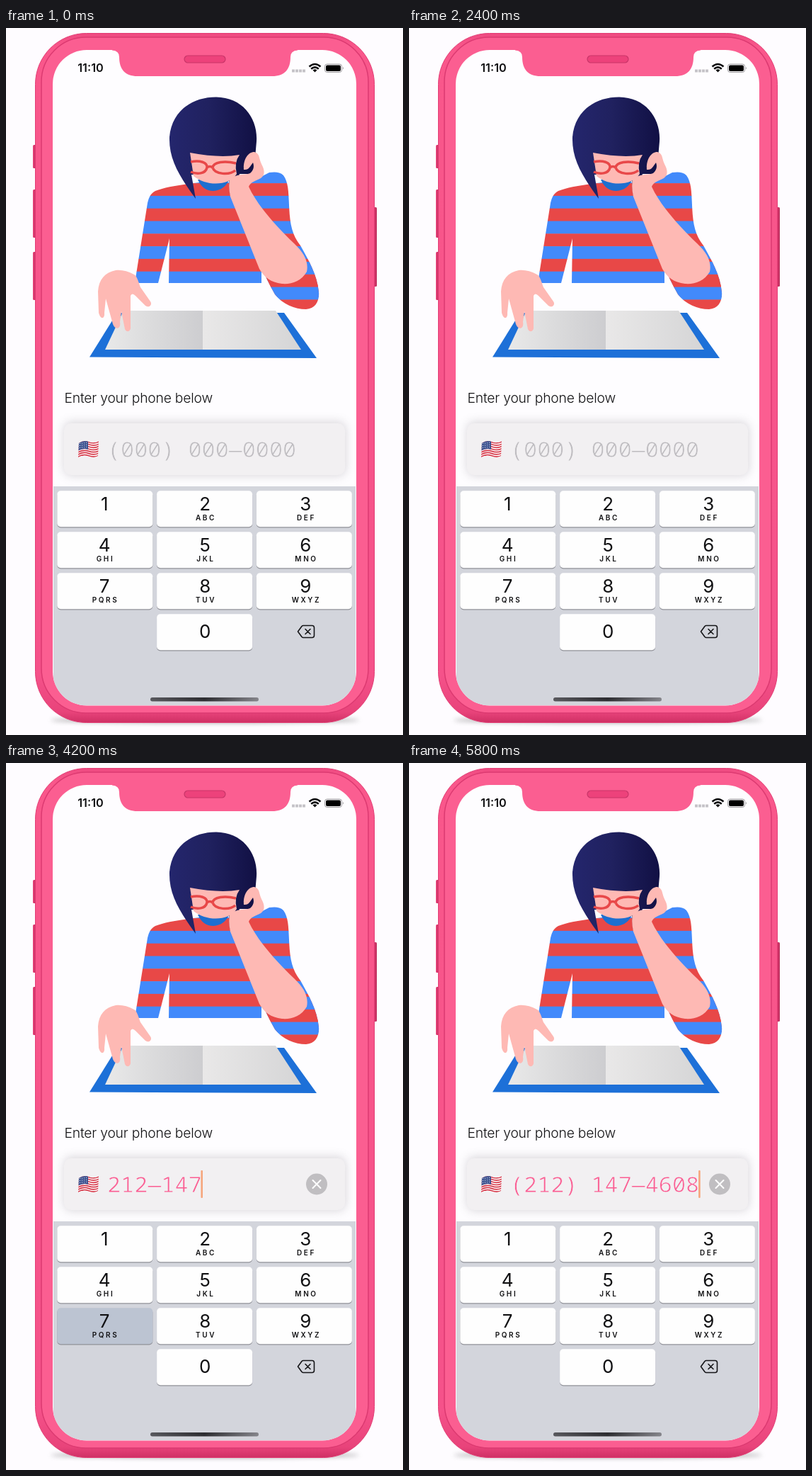
An HTML page that plays this animation: 561x998 px, repeating every 5.9 s.

```html
<!DOCTYPE html>
<html lang="en">
<head>
<meta charset="utf-8">
<title>Phone number entry</title>
<style>
  html, body { margin: 0; width: 100%; height: 100%; overflow: hidden; background: #fefcff; }
  svg { display: block; width: 100%; height: 100%; }
  text { font-family: Inter, Roboto, sans-serif; fill: #111113; }
  .digit { font-size: 26px; text-anchor: middle; }
  .letters { font-size: 10px; font-weight: 600; letter-spacing: 2.6px; text-anchor: middle; }
  .number { font: 300 31.8px "Noto Sans Mono", "DejaVu Sans Mono", monospace; stroke: #f2f0f2; stroke-width: .8px; }
</style>
</head>
<body>
<svg viewBox="0 0 561 998" xmlns="http://www.w3.org/2000/svg">
  <defs>
    <linearGradient id="hair"><stop stop-color="#24266d"/><stop offset=".45" stop-color="#20215f"/><stop offset="1" stop-color="#111044"/></linearGradient>
    <linearGradient id="leftPage"><stop stop-color="#e9e9e9"/><stop offset=".45" stop-color="#dcdcdd"/><stop offset="1" stop-color="#cdcdd0"/></linearGradient>
    <linearGradient id="rightPage"><stop stop-color="#e9e8e8"/><stop offset="1" stop-color="#d5d5d6"/></linearGradient>
    <linearGradient id="homeBar"><stop stop-color="#58585d"/><stop offset=".5" stop-color="#2d2d31"/><stop offset="1" stop-color="#85858b"/></linearGradient>
    <linearGradient id="rim" x2="0" y2="1"><stop stop-color="#ee4a81"/><stop offset=".02" stop-color="#f9578b"/><stop offset=".93" stop-color="#f5528a"/><stop offset=".985" stop-color="#e8437a"/><stop offset="1" stop-color="#cf3065"/></linearGradient>
    <linearGradient id="button"><stop stop-color="#e9427a"/><stop offset="1" stop-color="#b92a59"/></linearGradient>
    <filter id="soft" x="-20%" y="-40%" width="140%" height="180%"><feGaussianBlur stdDeviation="7"/></filter>
    <filter id="ground" x="-10%" y="-200%" width="120%" height="500%"><feGaussianBlur stdDeviation="3"/></filter>
    <clipPath id="screen"><rect x="66" y="31" width="429" height="925.500" rx="48"/></clipPath>
    <clipPath id="shirt">
      <path d="M273 218C250 221 226 224 211 230C204 234 202 239 200 247L182 360H215L231 297L230 360H361V336C366 350 372 362 380 376C391 390 408 397 424 397C437 396 443 386 442 373C440 348 427 327 416 307C404 292 401 276 400 250C399 230 399 218 392 208C387 203 380 203 372 204L345 218Z"/>
    </clipPath>
    <clipPath id="flag"><path d="M103 586Q110 581 117 584T131 583L130 604Q123 608 116 605T102 606Z"/></clipPath>
  </defs>

  <rect width="561" height="998" fill="#fefcff"/>
  <ellipse cx="281" cy="977" rx="218" ry="4" fill="#777" opacity=".65" filter="url(#ground)"/>
  <g id="buttons" fill="url(#button)"></g>
  <rect x="41.500" y="7.500" width="479" height="973" rx="72" fill="url(#rim)" stroke="#e23c74"/>
  <rect x="50" y="13" width="462" height="954" rx="63" fill="#fb5e91" stroke="#dc3a71" stroke-width="1.500"/>

  <g clip-path="url(#screen)">
    <rect x="66" y="31" width="430" height="926" fill="#fefdff"/>

    <g id="reader">
      <path d="M157 402H393L439 466L118 464.500Z" fill="#1d70d8"/>
      <path d="M166 399H278V454H140Z" fill="url(#leftPage)"/>
      <path d="M278 399H381L417 454H278Z" fill="url(#rightPage)"/>
      <g clip-path="url(#shirt)">
        <g id="stripes"></g>
        <g id="sleeve"></g>
      </g>
      <path d="M271 214Q278 230 293 230Q309 229 316 213Z" fill="#1d6fd0"/>
      <path d="M268 241C244 208 230 185 231 154C234 118 262 97.500 297 97.500C335 98 356 128 354 160L350 206H330L322 241L316 233L315 207H262Z" fill="url(#hair)"/>
      <path d="M260 176Q302 184 330 179Q322 190 326 206C315 223 284 224 265 209Z" fill="#feb9b4"/>
      <g fill="none" stroke="#e84849" stroke-width="3.500">
        <path d="M261 189C274 186 285 190 284 197C282 206 270 207 261 203M284 197Q288 194 292 197"/>
        <path d="M292 197C293 189 309 187 325 191M292 197C295 207 316 208 324 201"/>
      </g>
      <path d="M316 214C325 205 337 208 345 205C350 201 351 195 349 190C345 195 343 201 336 200C335 187 341 175 351 175C359 177 357 184 361 192C366 201 366 208 360 212C352 216 345 218 343 224C355 250 380 278 407 304C421 317 428 330 425 344C417 358 403 362 390 361C374 359 365 352 358 340L317 238Q314 225 316 214Z" fill="#feb9b4"/>
      <path d="M155 342C140 345 131 355 130 372L131 402C134 413 140 410 139 402L141 382L151 418C155 428 163 424 161 415L163 400L168 425C171 431 177 428 176 421L176 378Q178 373 183 378L197 392C203 396 207 390 204 386L190 366C187 358 185 350 181 348C172 343 163 341 155 342Z" fill="#feb9b4"/>
    </g>

    <text x="82.500" y="528.500" font-size="19.300" font-weight="300" letter-spacing="-.2">Enter your phone below</text>

    <rect x="82" y="556" width="398" height="76" rx="10" fill="#77727b" opacity=".28" filter="url(#soft)"/>
    <rect x="82" y="558" width="397" height="73" rx="10" fill="#f2f0f2"/>
    <g id="flagArt" clip-path="url(#flag)"></g>
    <text id="number" class="number" x="143" y="606"></text>
    <rect id="caret" y="575" width="2.600" height="39" rx="1" fill="#f6a67c"/>
    <g id="clear">
      <circle cx="439" cy="594.500" r="15" fill="#c0bec1"/>
      <path d="M433.500 589l11 11m0 -11l-11 11" stroke="#fff" stroke-width="2" stroke-linecap="round"/>
    </g>

    <rect x="67" y="647" width="427" height="309" fill="#d3d5dc"/>
    <g id="keys"></g>
    <path d="M420 843.500H432.500Q435.500 843.500 435.500 846.500V857.500Q435.500 860.500 432.500 860.500H420Q419 860.500 418 859.500L412.500 852L418 844.500Q419 843.500 420 843.500ZM423 848.500l7 7m0 -7l-7 7" fill="none" stroke="#151518" stroke-width="1.600" stroke-linecap="round" stroke-linejoin="round"/>
    <rect x="204" y="945" width="153" height="5.500" rx="2.700" fill="url(#homeBar)"/>
  </g>

  <path d="M150 30H412V31.500Q402 32 402 41C402 58 394 68 376 68H186C168 68 160 58 160 41Q160 32 150 31.500Z" fill="#fb5e91"/>
  <rect x="252" y="39" width="58" height="10" rx="5" fill="#ed427b" stroke="#c93569" stroke-width="1.200"/>

  <text x="119.500" y="62.300" font-size="16.300" font-weight="600" text-anchor="middle">11:10</text>
  <path d="M404 60.500H423" stroke="#c5c3c8" stroke-width="4" stroke-dasharray="4 1"/>
  <g fill="none" stroke="#0b0b0d" stroke-width="2.500">
    <path d="M428.500 54.500Q436.500 47.500 444.500 54.500M431.200 57.700Q436.500 53 441.800 57.700"/>
    <path d="M433.500 59.500Q436.500 57 439.500 59.500L436.500 62.500Z" fill="#0b0b0d" stroke="none"/>
  </g>
  <rect x="450.500" y="51" width="24" height="11.500" rx="3.300" fill="none" stroke="#9b999d"/>
  <rect x="452" y="52.500" width="21" height="8.500" rx="2"/>
  <path d="M476 55Q478 56.700 476 58.500Z" fill="#9b999d"/>
</svg>
<script>
const LOOP = 5900;
const ADVANCE = 19.1;
const PLACEHOLDER = '(000) 000—0000';
const DIGITS = '2121474608';
const PRESSES = [3000, 3200, 3400, 3700, 3900, 4100, 4500, 4800, 5100, 5400];
const HOLD = 200;
const ECHO = 100;
const RED = '#e84847';
const BLUE = '#428afb';

const el = id => document.getElementById(id);
const rect = (x, y, w, h, fill, rx = 0) =>
  `<rect x="${x}" y="${y}" width="${w}" height="${h}" rx="${rx}" fill="${fill}"/>`;
const clamp = v => Math.max(0, Math.min(1, v));

function drawButtons() {
  el('buttons').innerHTML = [[38, 165, 33], [38, 228, 68], [38, 316, 68], [519, 253, 112]]
    .map(([x, y, h]) => `<rect x="${x}" y="${y}" width="5" height="${h}" rx="1.5"/>`).join('');
}

function stripes(x, y, width, count, colors) {
  return Array.from({ length: count }, (_, i) =>
    rect(x, y + i * 17.8, width, 18.3, colors[i % 2])).join('');
}

function drawFlag() {
  let out = rect(100, 578, 34, 32, '#fff');
  for (let i = 0; i < 13; i += 2) {
    const y = 586.6 + i * 1.6;
    out += `<path d="M101 ${y}Q109 ${y - 5} 117 ${y - 2}T132 ${y - 3}" fill="none" stroke="#d63b4c" stroke-width="1.7"/>`;
  }
  out += '<path d="M101 580H116V595Q109 592 101 597Z" fill="#3f5592"/>';
  for (let i = 0; i < 12; i++) {
    out += `<circle cx="${104.5 + i % 4 * 3}" cy="${586.5 + Math.floor(i / 4) * 3 - i % 4 * .4}" r=".55" fill="#fff"/>`;
  }
  el('flagArt').innerHTML = out;
}

function drawKeys() {
  const letters = ['', 'ABC', 'DEF', 'GHI', 'JKL', 'MNO', 'PQRS', 'TUV', 'WXYZ'];
  el('keys').innerHTML = [1, 2, 3, 4, 5, 6, 7, 8, 9, 0].map(n => {
    const slot = n ? n - 1 : 10;
    const column = slot % 3;
    const x = 72.3 + column * 140.8;
    const y = 653.3 + Math.floor(slot / 3) * 58;
    const mid = 139.2 + column * 142;
    return rect(x, y + 1.2, 135, 51, '#909198', 5) +
      `<rect id="key${n}" x="${x}" y="${y}" width="135" height="51" rx="5"/>` +
      `<text class="digit" x="${mid}" y="${y + (n ? 27.5 : 34)}">${n}</text>` +
      (n ? `<text class="letters" x="${mid + 1.3}" y="${y + 42}">${letters[n - 1]}</text>` : '');
  }).join('');
}

function formatNumber(d) {
  if (d.length < 4) return d;
  if (d.length < 8) return `${d.slice(0, 3)}—${d.slice(3)}`;
  return `(${d.slice(0, 3)}) ${d.slice(3, 6)}—${d.slice(6)}`;
}

function caretOpacity(t) {
  if (t >= PRESSES[0]) return 1;
  const phase = (t + 600) % 1100;
  return clamp(phase / 130) * clamp((600 - phase) / 150);
}

function render(t) {
  const count = PRESSES.filter(p => t >= p + ECHO).length;
  const active = PRESSES.findIndex(p => t >= p && t < p + HOLD);
  const typed = formatNumber(DIGITS.slice(0, count));
  el('number').textContent = typed || PLACEHOLDER;
  el('number').style.fill = typed ? '#fb5c92' : '#bdbbbf';
  el('clear').style.display = typed ? '' : 'none';
  el('caret').setAttribute('x', 141.7 + typed.length * ADVANCE);
  el('caret').setAttribute('opacity', caretOpacity(t));
  for (let n = 0; n < 10; n++) {
    el('key' + n).setAttribute('fill', active >= 0 && +DIGITS[active] === n ? '#bcc4d2' : '#fefefe');
  }
}

el('stripes').innerHTML = stripes(170, 201.3, 285, 10, [BLUE, RED]);
el('sleeve').innerHTML = stripes(362, 330, 90, 4, [BLUE, RED]);
drawButtons();
drawFlag();
drawKeys();

const start = performance.now();
function tick() {
  render((performance.now() - start) % LOOP);
  requestAnimationFrame(tick);
}
tick();
</script>
</body>
</html>
```
